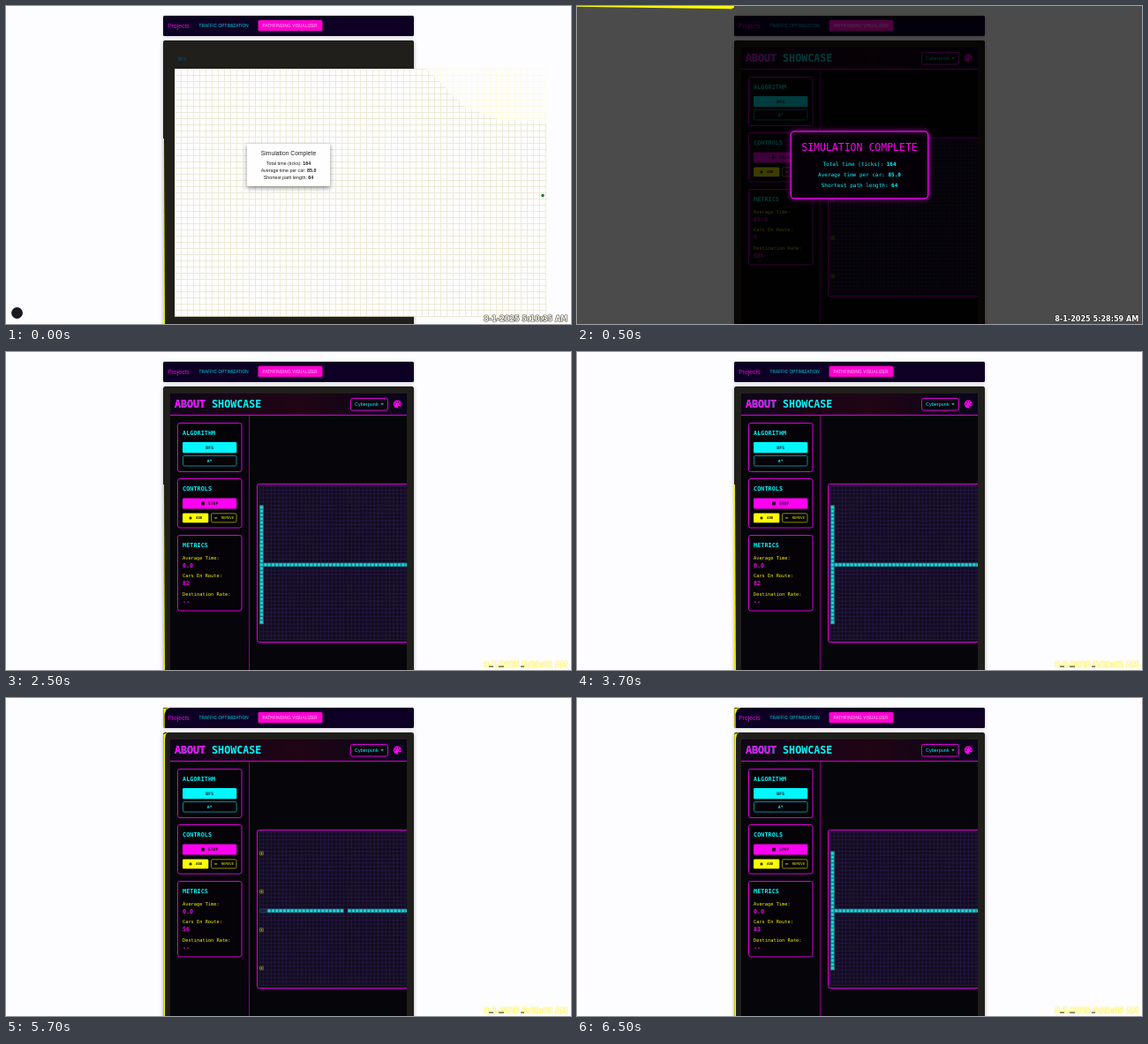
Write an HTML page with a canvas that moves like this. It is 640 px wide and 360 px high and loops after 8000 ms.

```html
<!DOCTYPE html>
<html lang="en">
<head>
<meta charset="utf-8">
<title>Traffic simulation</title>
<style>
html, body { margin: 0; width: 100%; height: 100%; overflow: hidden; background: #fdfdff; }
canvas { display: block; width: 640px; height: 360px; }
</style>
</head>
<body>
<canvas id="stage"></canvas>
<script>
const canvas = document.getElementById('stage');
const ctx = canvas.getContext('2d');
const ratio = window.devicePixelRatio || 1;
canvas.width = 640 * ratio;
canvas.height = 360 * ratio;
ctx.scale(ratio, ratio);

const SANS = '"Liberation Sans", Arial, sans-serif';
const MONO = '"DejaVu Sans Mono", monospace';
const STAMP = '"DejaVu Sans", sans-serif';
const PINK = '#ff00f4', CYAN = '#00f8ff', YELLOW = '#ffff00', EDGE = '#dc00dc';
const PAGE = '#fdfdff';
const LOOP = 8000;

function rect(x, y, w, h, color) {
  ctx.fillStyle = color;
  ctx.fillRect(x, y, w, h);
}

function box(x, y, w, h, r, fill, line, width = 1) {
  ctx.beginPath();
  ctx.roundRect(x, y, w, h, r);
  if (fill) { ctx.fillStyle = fill; ctx.fill(); }
  if (line) { ctx.strokeStyle = line; ctx.lineWidth = width; ctx.stroke(); }
}

// Runs draw with a soft shadow or glow
function withShadow(color, blur, dy, draw) {
  ctx.save();
  ctx.shadowColor = color;
  ctx.shadowBlur = blur * ratio;
  ctx.shadowOffsetY = dy * ratio;
  draw();
  ctx.restore();
}

function shape(points, color) {
  ctx.beginPath();
  points.forEach(([x, y]) => ctx.lineTo(x, y));
  ctx.fillStyle = color;
  ctx.fill();
}

function disc(x, y, r, color) {
  ctx.beginPath();
  ctx.arc(x, y, r, 0, Math.PI * 2);
  ctx.fillStyle = color;
  ctx.fill();
}

function text(str, x, y, size, color, { face = MONO, bold = false, gap = 0, align = 'left' } = {}) {
  ctx.font = `${bold ? 'bold ' : ''}${size}px ${face}`;
  ctx.letterSpacing = gap + 'px';
  ctx.textAlign = align;
  ctx.fillStyle = color;
  ctx.fillText(str, x, y);
}

// A centred label followed by a bold value
function pair(label, value, y, size, color, face) {
  ctx.letterSpacing = '0px';
  ctx.font = `${size}px ${face}`;
  const a = ctx.measureText(label).width;
  ctx.font = `bold ${size}px ${face}`;
  const x = 320 - (a + ctx.measureText(value).width) / 2;
  text(label, x, y, size, color, { face });
  text(value, x + a, y, size, color, { face, bold: true });
}

function results(y, step, size, color, face) {
  pair('Total time (ticks): ', '164', y, size, color, face);
  pair('Average time per car: ', '85.0', y + step, size, color, face);
  pair('Shortest path length: ', '64', y + 2 * step, size, color, face);
}

function navBar() {
  withShadow('rgba(0,0,0,.25)', 3, 0.6, () => box(178, 11, 284, 23, 1.5, '#0d0024'));
  text('Projects', 183.3, 24.5, 6.67, '#f000e0', { face: SANS, gap: 0.05 });
  text('TRAFFIC OPTIMIZATION', 218.5, 24, 4.67, '#00dcf0', { face: SANS, gap: 0.13 });
  box(285.5, 16, 73, 12.3, 1.5, '#ff00d0');
  text('PATHFINDING VISUALIZER', 290.5, 24, 4.67, '#ffc4f4', { face: SANS, gap: 0.13 });
}

function panel(color, r) {
  withShadow('rgba(0,0,0,.3)', 4, 0.6, () => box(178, 39, 284, 330, r, color));
}

function gridLines(color) {
  ctx.beginPath();
  for (let x = 191.5; x <= 612; x += 7) { ctx.moveTo(x, 71); ctx.lineTo(x, 351); }
  for (let y = 71.5; y <= 352; y += 7) { ctx.moveTo(191, y); ctx.lineTo(612, y); }
  ctx.strokeStyle = color;
  ctx.lineWidth = 0.8;
  ctx.stroke();
}

function lightScene() {
  rect(0, 0, 640, 360, PAGE);
  navBar();
  panel('#201f1b', 2);
  shape([[178, 150], [179, 150], [180, 360], [178, 360]], '#f0ee00');
  text('BFS', 195, 62, 4.67, '#0a4f86', { face: SANS, gap: 0.13 });
  rect(191, 71, 421, 280, PAGE);
  gridLines('#e9e7cd');
  ctx.save();
  ctx.beginPath();
  [[476, 70], [613, 70], [613, 132], [560, 129], [520, 114]].forEach(([x, y]) => ctx.lineTo(x, y));
  ctx.clip();
  rect(470, 70, 150, 70, PAGE);
  gridLines('#fffcd6');
  ctx.restore();
  disc(608, 214.5, 1.7, '#087a18');

  withShadow('rgba(0,0,0,.45)', 5, 2, () => box(273, 156, 94, 48, 1.3, '#fefeff'));
  text('Simulation Complete', 320, 169, 6.67, '#222', { face: SANS, gap: 0.05, align: 'center' });
  results(180, 8, 5.33, '#222', SANS);
  disc(12.5, 347.5, 6.4, '#191922');
}

function card(title, y, h) {
  box(194.5, y, 72.5, h, 2.3, '#050208', EDGE, 1);
  text(title, 200, y + 13.5, 6.67, CYAN, { bold: true, gap: 0.13 });
}

function metric(label, value, y) {
  text(label, 200, y, 5.33, '#f4f400');
  text(value, 200, y + 9, 6.67, PINK, { bold: true });
}

function sidebar(s) {
  rect(275, 72, 1, 288, '#850085');

  card('ALGORITHM', 80.5, 55);
  box(200, 102, 61.3, 12.3, 1.3, CYAN);
  text('BFS', 230.7, 110, 4.67, '#061820', { bold: true, gap: 0.15, align: 'center' });
  box(200.5, 117.5, 60.5, 11.5, 1.3, null, '#00aebb', 0.8);
  text('A*', 230.7, 124.8, 4.67, CYAN, { bold: true, gap: 0.15, align: 'center' });

  card('CONTROLS', 143.5, 55.5);
  box(200, 165.5, 61.3, 12, 1.3, PINK);
  if (s.done) shape([[221, 169.5], [225, 171.5], [221, 173.5]], '#180018');
  else rect(221, 169.6, 3.8, 3.8, '#180018');
  text(s.done ? 'START' : 'STOP', 229, 173.2, 4.67, '#180018', { bold: true });
  box(200, 182.5, 29.3, 10.7, 1.3, YELLOW);
  disc(209, 187.9, 1.6, '#353500');
  text('ADD', 215, 189.3, 4, '#252500', { bold: true });
  box(232.5, 182.8, 28.5, 10, 1.3, null, '#a9a900', 0.8);
  rect(236, 187.4, 3.2, 1, '#d0d000');
  text('REMOVE', 243.7, 189.3, 4, '#e0e000');

  card('METRICS', 207.5, 85.5);
  metric('Average Time:', s.avg, 235);
  metric('Cars En Route:', s.cars, 255.3);
  metric('Destination Rate:', s.rate, 275.6);
}

const CELL = 13 / 3;
const cellX = col => 287.3 + col * CELL;
const cellY = row => 152 + row * CELL;

function car(col, row) {
  const x = cellX(col), y = cellY(row);
  rect(x, y, CELL, CELL, '#0c929b');
  rect(x + 0.8, y + 0.8, CELL - 1.6, CELL - 1.6, '#22d4d6');
}

function road(s) {
  ctx.save();
  ctx.beginPath();
  ctx.rect(276, 72, 178, 288);
  ctx.clip();
  box(284.5, 149.5, 220, 179, 2, '#120c1f', EDGE, 1);
  ctx.beginPath();
  for (let c = 0; c < 40; c++) { ctx.moveTo(cellX(c), 152); ctx.lineTo(cellX(c), 325.3); }
  for (let r = 0; r <= 40; r++) { ctx.moveTo(287.3, cellY(r)); ctx.lineTo(460, cellY(r)); }
  ctx.strokeStyle = '#2a1a4c';
  ctx.lineWidth = 0.7;
  ctx.stroke();

  for (const r of [5, 15, 25, 35]) {
    box(cellX(0) + 0.2, cellY(r) + 0.2, 3.9, 3.9, 0.4, '#1c1b0c', '#a09a30', 0.6);
    rect(cellX(0) + 1.5, cellY(r) + 1.5, 1.4, 1.4, '#d8d050');
  }
  if (s.column) for (let r = 5; r <= 35; r++) car(0, r);
  if (!s.done) {
    for (let c = s.column ? 0 : 2; c < 40; c++) {
      if (s.column || c !== 22) car(c, 20);
    }
    if (!s.column) box(cellX(0) + 0.3, cellY(20) + 0.3, 8, 3.7, 0.4, '#18203a', '#34507a', 0.6);
  }
  ctx.restore();
}

function paletteIcon() {
  disc(443.3, 59, 4.5, PINK);
  for (const [x, y] of [[440.6, 59], [442, 56.8], [444.7, 56.8], [446.1, 59]]) disc(x, y, 0.75, '#12000f');
  disc(445.2, 62, 1.3, '#12000f');
}

function darkScene(s) {
  rect(0, 0, 640, 360, PAGE);
  navBar();
  panel('#201f1b', 2.5);
  if (s.trail === 1) {
    shape([[178, 150], [179, 150], [180, 360], [178, 360]], '#e8e600');
  } else if (s.trail === 2) {
    shape([[178.3, 12], [186, 11], [181.5, 13], [179.6, 18], [179.6, 34], [178.3, 34]], YELLOW);
    shape([[178.3, 41], [184, 39], [181, 41], [180, 46], [180, 360], [178.3, 360]], YELLOW);
  }
  rect(186, 47, 268, 313, '#05050a');
  const head = ctx.createLinearGradient(186, 0, 454, 0);
  head.addColorStop(0, '#10041a');
  head.addColorStop(0.55, '#200514');
  head.addColorStop(1, '#08051a');
  rect(186, 47, 268, 25, head);
  rect(186, 71, 268, 1, EDGE);
  text('ABOUT SHOWCASE', 191, 63, 11.67, CYAN, { bold: true });
  ctx.save();
  ctx.beginPath();
  ctx.rect(186, 48, 47, 22);
  ctx.clip();
  text('ABOUT', 191, 63, 11.67, PINK, { bold: true });
  ctx.restore();
  box(390.5, 52.5, 42, 13.5, 2, '#08040f', EDGE, 1);
  text('Cyberpunk', 395, 61, 5.33, CYAN, { face: SANS, gap: 0.1 });
  shape([[424.3, 58.2], [427.7, 58.2], [426, 60]], CYAN);
  paletteIcon();
  sidebar(s);
  road(s);
}

function darkModal() {
  rect(0, 0, 640, 360, 'rgba(0,0,0,.7)');
  rect(178, 39, 284, 321, 'rgba(0,0,0,.2)');
  shape([[0, 0], [178, 0], [178, 1.5], [175, 3.2], [120, 2.4], [0, 0.8]], YELLOW);
  withShadow('rgba(255,0,255,.4)', 7, 0, () => box(242.3, 142, 155.4, 76, 4, '#050007', '#e600e6', 1.4));
  text('SIMULATION COMPLETE', 320, 163.7, 11.5, PINK, { align: 'center' });
  results(181.3, 11.6, 6, CYAN, MONO);
}

function stamp(time, color, line) {
  const str = `8-1-2025 ${time} AM`;
  const opts = { face: STAMP, bold: true, align: 'right' };
  ctx.font = `bold 8.1px ${STAMP}`;
  ctx.letterSpacing = '0px';
  ctx.textAlign = 'right';
  ctx.strokeStyle = line;
  ctx.lineWidth = 1.2;
  ctx.lineJoin = 'round';
  ctx.strokeText(str, 636.3, 356.5);
  text(str, 636.3, 356.5, 8.1, color, opts);
}

function fadedStamp(time) {
  stamp(time, '#fffde0', '#fff45c');
  for (const [x, w] of [[547, 5], [558, 6], [583, 4]]) rect(x, 355.4, w, 1.4, '#66644a');
}

const running = { avg: '0.0', rate: '--', done: false };
const scenes = [
  { from: 0, draw() { lightScene(); stamp('5:10:35', '#f4f2ea', '#5a574c'); } },
  { from: 500, draw() {
    darkScene({ avg: '85.0', cars: '0', rate: '98%', done: true, trail: 0 });
    darkModal();
    stamp('5:28:59', '#fff', '#222');
  } },
  { from: 2500, draw() {
    darkScene({ ...running, cars: '82', column: true, trail: 1 });
    fadedStamp('5:29:01');
  } },
  { from: 4500, draw() {
    darkScene({ ...running, cars: '56', column: false, trail: 2 });
    fadedStamp('5:29:03');
  } },
  { from: 6500, draw() {
    darkScene({ ...running, cars: '83', column: true, trail: 2 });
    fadedStamp('5:29:05');
  } }
];

const start = performance.now();
function tick() {
  const t = (performance.now() - start) % LOOP;
  scenes.filter(s => s.from <= t).pop().draw();
  requestAnimationFrame(tick);
}
tick();
</script>
</body>
</html>
```
